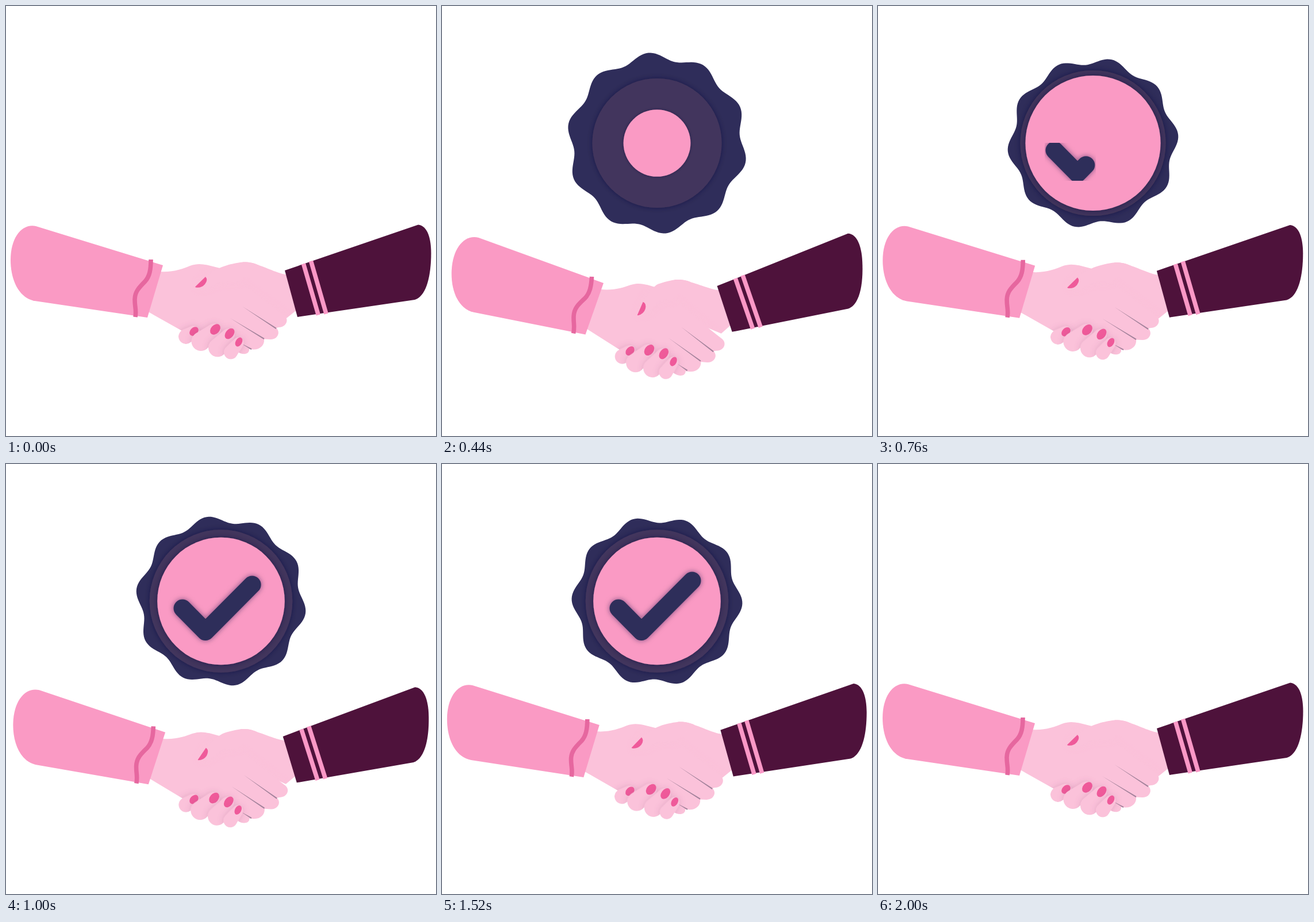
An HTML page for the animation above (2040 ms loop, 748 px wide and 748 px high).

```html
<!DOCTYPE html>
<html lang="en">
<head>
<meta charset="utf-8">
<title>Handshake</title>
<style>
  html, body { margin: 0; width: 100%; height: 100%; overflow: hidden; background: #fff; }
  svg { display: block; width: 100vw; height: 100vh; }
  .skin { fill: #fbc2da; }
  .nail { fill: #ef5a9a; }
  .pink { fill: #fa9ac4; }
  .plum { fill: #4e123b; }
  .navy { fill: #2f2d5a; }
  .line { fill: none; }
</style>
</head>
<body>
<svg viewBox="0 0 748 748">
  <defs>
    <filter id="soft" x="-30%" y="-30%" width="160%" height="160%"><feGaussianBlur stdDeviation="8"/></filter>
    <filter id="fingerShade" x="-60%" y="-60%" width="220%" height="220%">
      <feDropShadow dx="0" dy="0" stdDeviation="6" flood-color="#8a4a78" flood-opacity=".24"/>
    </filter>
    <filter id="glow" x="-30%" y="-30%" width="160%" height="160%">
      <feDropShadow dx="0" dy="0" stdDeviation="5" flood-color="#191334" flood-opacity=".5"/>
    </filter>
    <clipPath id="onLeft"><use href="#leftHand"/></clipPath>
    <clipPath id="onRight"><use href="#rightHand"/></clipPath>
    <clipPath id="onHands"><use href="#leftHand"/></clipPath>
  </defs>

  <g id="badge">
    <path id="star" class="navy"/>
    <g id="ring"><circle r="124.3" fill="#43365d" filter="url(#glow)"/></g>
    <g id="disc"><circle r="110.8" class="pink" filter="url(#glow)"/></g>
    <g filter="url(#glow)">
      <path id="check" class="line" stroke="#2f2d5a" stroke-width="31" stroke-linecap="round" stroke-linejoin="round"/>
    </g>
  </g>

  <path id="rightHand" data-side="right" class="skin"
    d="M488 467C478 467 455 456 440 451C430 446 420 445 412 445.5L380 470L440 520L488 543L508 527Z"/>
  <g clip-path="url(#onRight)"><use href="#leftHand" filter="url(#soft)" style="fill:#8a4a78" opacity=".22"/></g>
  <path id="leftHand" data-side="left" class="skin"
    d="M266 462C290 464 308 457 320 452C333 447.5 340 449 350 450.5L372 456L405 480C430 498 455 518 484 538
       C493 545 488 559 474 559L470 560C478 567 473 580 460 580L449 579.5C450 589 443 598 430 597.5L423 597
       C424 606 411 608 402 601L380 600L320 580L306 565L244 530Z"/>
  <g clip-path="url(#onLeft)"><use href="#thumb" filter="url(#soft)" fill="#8a4a78" opacity=".24"/></g>
  <g data-side="left" data-bend="1.5 480 555" fill="#a3829b">
    <path d="M411 522.5L470.5 560L469.5 562Z"/>
    <path d="M390 543L449.5 578L448.5 580Z"/>
    <path d="M409 587L427.5 596L426.5 598Z"/>
  </g>
  <path id="thumb" data-side="right"/>
  <path class="nail" data-side="right" data-bend="-20 380 453"
    d="M329 488.5L347 471Q352 476 346 484Q340 491 330 489.5Z"/>
  <g id="fingers" clip-path="url(#onHands)"></g>

  <g data-side="left">
    <path class="pink" d="M52 383L273 451L246 542L50 513C22 508 8 476 8 442C8 402 28 378 52 383Z"/>
    <path class="line" stroke="#e6679f" stroke-width="7.6"
      d="M252 441C252 458 250 470 242 479C230 491 224 498 224 511C224 524 227 528 225 541"/>
  </g>
  <g data-side="right">
    <path class="plum" d="M485 460L717 380.5C733 382 739.5 404 739.5 430C739.5 470 731 505 711 511L507 541Z"/>
    <path class="line" stroke="#fa98c6" stroke-width="7.6" d="M517.5 448.5L543.3 537.5M530.5 443.8L557 535.5"/>
  </g>
</svg>

<script>
const LOOP = 2040, STEP = 40, TAU = 2 * Math.PI;
const $ = id => document.getElementById(id);

function add(parent, tag, attrs) {
  const node = document.createElementNS("http://www.w3.org/2000/svg", tag);
  for (const key in attrs) node.setAttribute(key, attrs[key]);
  return parent.appendChild(node);
}

// Outline of two circles joined by their outer tangents
function capsule(x1, y1, r1, x2, y2, r2) {
  const along = Math.atan2(y2 - y1, x2 - x1);
  const spread = Math.acos((r1 - r2) / Math.hypot(x2 - x1, y2 - y1));
  const at = (x, y, r, a) => `${x + r * Math.cos(a)} ${y + r * Math.sin(a)}`;
  const up = along - spread, down = along + spread;
  return `M${at(x1, y1, r1, down)}A${r1} ${r1} 0 1 1 ${at(x1, y1, r1, up)}` +
    `L${at(x2, y2, r2, up)}A${r2} ${r2} 0 0 1 ${at(x2, y2, r2, down)}Z`;
}

const fingers = [
  { body: [313, 575, 13, 326, 567, 10.5], nail: [327, 566, 9, 6.5, -45], shift: "1 -1" },
  { body: [339, 583.5, 16.5, 362, 564, 11.5], nail: [364, 562.5, 10.5, 7.5, -48], shift: "-2.5 3" },
  { body: [368, 594.5, 16, 387, 572, 11], nail: [389, 570, 10.5, 7, -52], shift: "-2.5 3" },
  { body: [391, 602.5, 12, 404, 586, 9.5], nail: [405, 584.5, 8.5, 5.5, -60], shift: "-2.5 3" }
];
fingers.forEach(({ body, nail, shift }, i) => {
  const side = { "data-side": "right", "data-shift": shift };
  const [cx, cy, rx, ry, turn] = nail;
  add($("fingers"), "path", { id: "finger" + i, class: "skin", d: capsule(...body), filter: "url(#fingerShade)", ...side });
  const tip = add($("fingers"), "g", side);
  add(tip, "ellipse", { class: "nail", cx, cy, rx, ry, transform: `rotate(${turn} ${cx} ${cy})` });
  add($("onHands"), "use", { href: "#finger" + i });
});
$("thumb").style.fill = "";

const starPoints = Array.from({ length: 240 }, (_, i) => {
  const a = i / 240 * TAU, r = 142.3 + 6.2 * Math.cos(10 * a);
  return `${(r * Math.cos(a)).toFixed(2)} ${(r * Math.sin(a)).toFixed(2)}`;
});
$("star").setAttribute("d", `M${starPoints.join("L")}Z`);

// Quick start, long settling: cubic Bezier (.33, 0, .3, 1)
function ease(x) {
  if (x <= 0) return 0;
  if (x >= 1) return 1;
  let lo = 0, hi = 1;
  for (let i = 0; i < 24; i++) {
    const s = (lo + hi) / 2, q = 1 - s;
    if (.99 * q * q * s + .9 * q * s * s + s * s * s < x) lo = s; else hi = s;
  }
  return lo * lo * (3 - 2 * lo);
}
const tween = (t, from, to) => ease((t - from) / (to - from));
const pop = t => 1.095 * tween(t, 155, 510) - .095 * tween(t, 510, 815);

function thumbPath(dip) {
  const a = -20 * dip * Math.PI / 180, c = Math.cos(a), s = Math.sin(a);
  const p = (x, y) => `${380 + (x - 380) * c - (y - 453) * s} ${453 + (x - 380) * s + (y - 453) * c} `;
  return "M440 451C430 446 420 445 412 445.5C400 447 388 449.5 380 452.5" +
    `C${p(366, 457)}${p(357, 464)}${p(347, 471)}L${p(330, 489)}Q${p(336, 491)}${p(343, 490.5)}` +
    `C${p(355, 492)}${p(362, 485)}${p(368, 482)}C380 477 395 479 405 480Z`;
}

const movers = [...document.querySelectorAll("[data-side]")];
const times = (list, k) => list.split(" ").map(v => v * k).join(" ");

function drawHands(t) {
  const dip = t < 1600 ? (1 - Math.cos(TAU * t / 800)) / 2 : 0;
  const pose = {
    left: `translate(${8.2 * dip} ${31.7 * dip}) rotate(${2.9 * dip} 273 451)`,
    right: `translate(${-6.7 * dip} ${27.7 * dip}) rotate(${-3 * dip} 486 459)`
  };
  for (const node of movers) {
    const { side, bend, shift } = node.dataset;
    let move = pose[side];
    if (shift) move = `translate(${times(shift, dip)}) ${move}`;
    if (bend) {
      const [angle, x, y] = bend.split(" ");
      move += ` rotate(${angle * dip} ${x} ${y})`;
    }
    node.setAttribute("transform", move);
  }
  $("thumb").setAttribute("d", thumbPath(dip));
}

function drawCheck(progress) {
  const first = 57, second = 125, drawn = progress * (first + second);
  const a = Math.min(drawn / first, 1), b = Math.max(0, (drawn - first) / second);
  $("check").setAttribute("d", progress > 0
    ? `M-67 12.5l${40 * a} ${40.5 * a}` + (b > 0 ? `l${88 * b} ${-88.5 * b}` : "")
    : "");
}

function drawBadge(t) {
  const leave = tween(t, 1592, 2000);
  $("badge").style.display = t < 160 || leave >= 1 ? "none" : "";
  $("badge").setAttribute("transform", `translate(374 238.5) rotate(${135 * leave}) scale(${1 - leave})`);
  $("star").setAttribute("transform", `rotate(${-12.5 + .0567 * t}) scale(${pop(t)})`);
  $("ring").setAttribute("transform", `scale(${pop(t - 80)})`);
  $("disc").setAttribute("transform", `scale(${pop(t - 160)})`);
  drawCheck(tween(t, 572, 1146));
}

const start = performance.now();
function frame() {
  const t = Math.floor((performance.now() - start) % LOOP / STEP) * STEP;
  drawHands(t);
  drawBadge(t);
  $("thumb").setAttribute("fill", "#fbc2da");
  requestAnimationFrame(frame);
}
frame();
</script>
</body>
</html>
```
